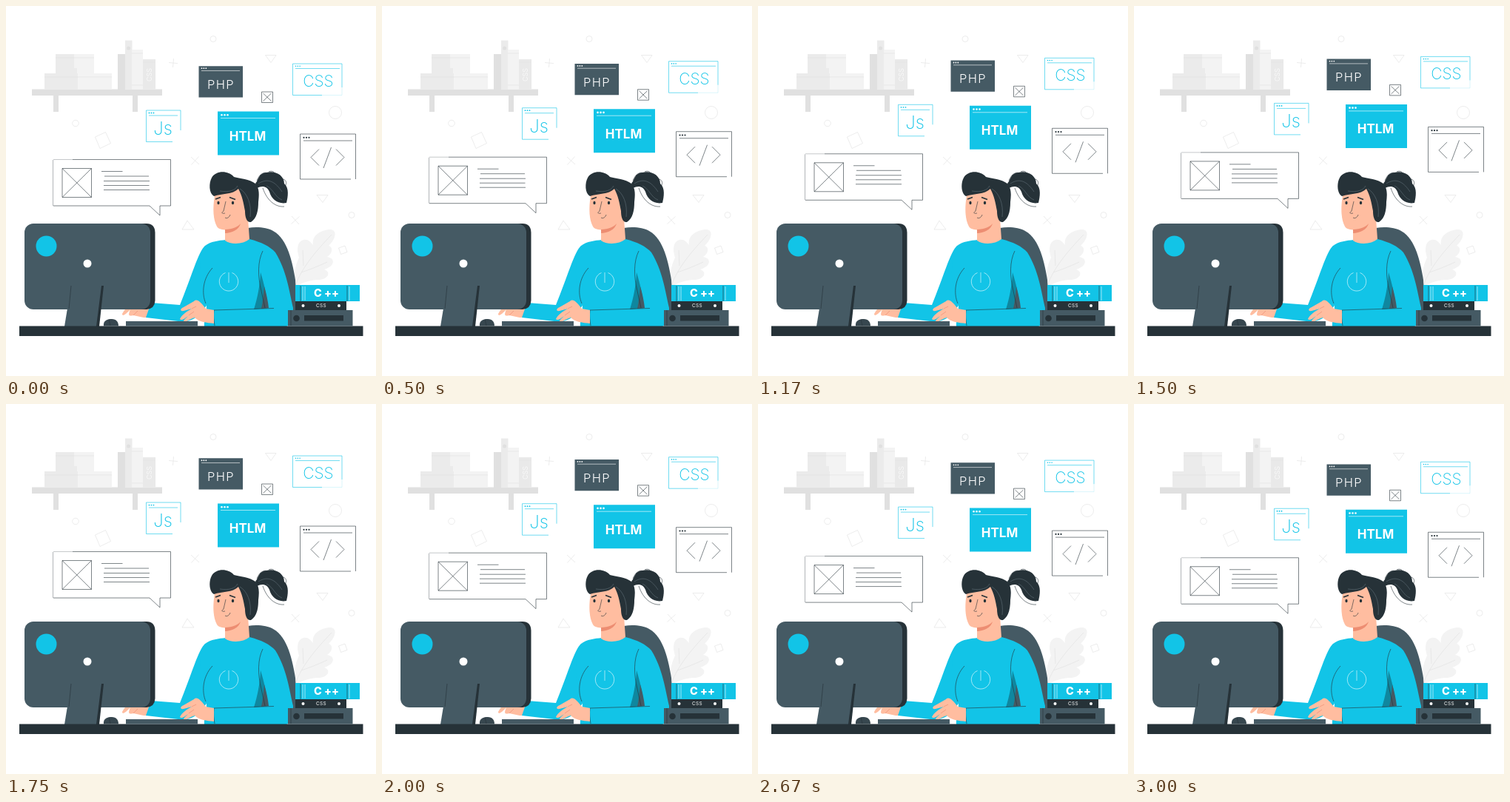
Animation, 500 px wide and 500 px high, one loop 3.04 s. Source, as an HTML page:

```html
<!DOCTYPE html>
<html lang="en">
<head>
<meta charset="utf-8">
<title>Coding at a desk</title>
<style>
html, body { margin: 0; width: 100%; height: 100%; overflow: hidden; background: #fff; }
svg { display: block; width: 100vw; height: 100vh; }
text { font-family: Inter, "Open Sans", sans-serif; text-anchor: middle; }
.line { fill: none; stroke: #263238; stroke-width: .6; }
.faint { fill: none; stroke: #e0e0e0; stroke-width: .6; }
.cyan { fill: #12c4e7; }
.dark { fill: #263238; }
.slate { fill: #455a64; }
.skin { fill: #ffbda0; }
.white { fill: #fff; }
.blue { stroke: #12c4e7; }
.pale { stroke: #fff; }
.blush { stroke: #e98970; }
.strand { stroke: #607078; }
</style>
</head>
<body>
<svg viewBox="0 0 500 500">
  <!-- shelf -->
  <g fill="#e0e0e0">
    <path d="M35 112.500h176v8.500H35zM64 121h7v22h-7zM171 121h7v22h-7zM151 65h10v47.500h-10z"/>
    <path fill="#ebebeb" d="M52 91h45v21.500H52zM67 65h29v26H67zM161 46.500h9.500v66H161z"/>
    <path fill="#f3f3f3" d="M97 91h46v21.500H97zM92 65h27v19H92zM96 84h23v7H96zM170 59h15v53.500h-15z"/>
    <path fill="#e9e9e9" d="M185 72h17v40.500h-17z"/>
    <path class="faint" d="M52 96h91M67 70h52M170 64h15M170 107h15M185 76h17M164 56h4"/>
    <circle cx="165.500" cy="57" r="2.500"/>
    <text transform="translate(197 93) rotate(-90)" font-size="9" fill="#f8f8f8">CSS</text>
  </g>

  <!-- scattered shapes -->
  <g class="faint">
    <circle cx="280" cy="44.500" r="4"/><circle cx="445" cy="144" r="8.500"/>
    <circle cx="94" cy="158.500" r="4.300"/><circle cx="467" cy="282.500" r="4"/>
    <path d="M220 76.500l12 1M226.500 71l-1 12M350.500 66.500h14.500l-7 10zM250 204l11 10M260.500 203.500l-10 11M386 284l10 11M396.500 284.500l-11 10M420 255.500h15l-7 10zM238 302l7-12 9 12z"/>
    <path d="M120.500 177l14-6.500 7 15-14.500 7zM449.500 327l8.500-3 3 8.500-8.500 3z"/>
  </g>

  <!-- leaf -->
  <path fill="#f3f3f3" d="M391 378C388 367 390 352 396 340C392 328 394 318 402 316C409 315 411 319 415 323C413 310 424 304 436 302C449 301 446 315 436 324C441 325 443 333 434 339C446 341 444 352 430 356C441 360 434 371 420 370C408 371 398 375 394 378z"/>
  <path class="faint" d="M391 378C399 355 417 333 440 309M402 351L401 330M399 360C411 356 421 352 434 346"/>

  <!-- chair -->
  <path class="slate" d="M298 318C312 296 346 296 361 304C381 315 387 347 391 370L393 412H350z"/>

  <!-- far hand and arm -->
  <path class="skin" d="M196 402C183 398 178 391 174 396C168 402 160 410 157 416C157 420 162 417 168 410C165 417 165 420 172 418L186 421H194z"/>
  <path class="line blush" d="M168 410L173 406M172 418L178 412"/>
  <path class="cyan" d="M269 324C260 331 250 368 235 404L196 401L189 421L237 426.500C260 428 272 405 284 380z"/>

  <!-- torso -->
  <path class="cyan" d="M269 324C277 318 287 317 297 316C305 321 319 321 329 315C345 319 357 325 364 333C379 357 383 386 388 408C388 422 385 430 379 433H268C267 420 277 405 265 385C260 365 261 340 269 324z"/>
  <path fill="#0f879f" d="M344 360C349 376 352 390 354 408L335 410C340 393 343 379 344 360z"/>
  <path class="slate" d="M349 379C352 389 354 399 355 408L345 409C347 400 348 390 349 379z"/>
  <path class="line" d="M347 331C340 345 340 365 345 385L350 408M281 411L362 408.500M279 354C266 368 264 388 270 402M281 411C280 419 281 425 282 432"/>
  <path class="line pale" d="M296.500 360.500A12.700 12.700 0 1 0 305.500 360.500M301 360V374"/>

  <!-- near hand -->
  <path class="skin" d="M281 411L270 409C263 400 258 395 254 399L240 407C235 409 235 413 240 412L251 409C244 413 238 417 235 423C237 426 242 422 247 418C242 423 238 426 241 427C246 426 250 422 255 421C261 427 271 428 281 429z"/>
  <path class="line blush" d="M251 409L257 406M247 418L254 413"/>

  <!-- ponytail, head and hair -->
  <path class="dark" d="M337 240C342 234 341 226 352 225C364 222 376 229 376 240C383 246 381 258 379 266C368 268 359 262 356 251C353 244 347 242 339 246z"/>
  <path class="line" d="M339 236C343 226 349 224 354 226M355 224C361 221 366 227 363 231M347 246C353 264 365 272 376 271M374 234C380 235 379 241 377 244"/>
  <path class="line strand" d="M341 240C355 231 365 239 373 251M352 243C361 247 364 259 373 262"/>
  <path class="skin" d="M296 297V317C304 323 321 322 329 315L327 287C332 275 328 251 317 246C300 243 284 247 282 256C279 274 280 289 285 298C288 303 298 303 305 302z"/>
  <path fill="#ed8d72" d="M296 302C306 302 314 298 317 294C315 302 305 307 296 307z"/>
  <path class="dark" d="M281 257C274 253 274 239 278 232C284 222 300 222 308 231C316 233 329 234 337 240C343 247 342 256 341 265C341 276 339 287 331 292C325 293 323 285 323 277C321 266 319 256 314 247C306 255 292 253 281 257z"/>
  <path class="line" d="M297 264L294 277C291 279 291 281 296 280M296 286C299 288 302 285 303 282"/>
  <path class="line" style="stroke-width:1.600" d="M283 261L290 258.500M302 258.500L310 261.500"/>
  <path class="line strand" d="M289 250C302 252 310 249 313 243M316 247C326 253 332 267 330 285"/>
  <ellipse class="dark" cx="287" cy="266" rx="1.600" ry="2.200"/>
  <ellipse class="dark" cx="306.500" cy="266" rx="1.700" ry="2.300"/>

  <!-- monitor -->
  <path class="dark" d="M40 294H190Q201 294 201.500 306V398Q201 409 190 410H40z"/>
  <rect class="slate" x="25" y="294" width="170" height="116" rx="12"/>
  <path class="dark" d="M124 378H132L126 433H118z"/>
  <path class="slate" d="M88 378H129L122 433H79z"/>
  <path class="line" d="M88 378L85 409"/>
  <circle class="white" cx="110" cy="348" r="5.500"/>
  <circle class="cyan" cx="54.500" cy="324.500" r="14"/>

  <!-- desk -->
  <rect class="dark" x="18" y="432.500" width="464.500" height="13.500"/>
  <path fill="#37474f" d="M132 432.500C131 425 137 423 143 423C149 423 152 427 152 432.500z"/>
  <path class="line" d="M139 423L141 432"/>
  <path class="slate" d="M162 426H259V432.500H162z"/>

  <!-- books -->
  <path class="slate" d="M381 411H468.500V432.500H381z"/>
  <path class="dark" d="M403 418H456V425.500H403zM391 399H460V411H391z"/>
  <path class="line" d="M385 411V432"/>
  <circle class="dark" cx="392.500" cy="422" r="4.300"/>
  <circle class="white" cx="401.500" cy="405" r="2"/><circle class="white" cx="450" cy="405" r="2"/>
  <text class="white" x="426" y="407.300" font-size="6.500" letter-spacing=".3">CSS</text>
  <path class="cyan" d="M391 377H478V399H391z"/>
  <path class="line" d="M398 378V399M461 378V399"/>
  <path class="line pale" d="M401 379V398M404 379V398M464 379V398"/>
  <text class="white" x="433" y="392.500" font-size="14.500" font-weight="800">C ++</text>

  <!-- floating panels -->
  <g id="float">
    <path class="line" stroke-opacity=".6" d="M63.500 208V270"/>
    <path class="line" d="M90 207.500H222.500V270H208V283L194 270H64"/>
    <path class="line" stroke-opacity=".45" d="M64 207.500H90"/>
    <path class="line" d="M76 219.500H115.500V258.500H76zL115.500 258.500M115.500 219.500L76 258.500M129 223.500H157.500M133 230H193M132 236.500H194M132 242.500H193.500M132 248.500H194"/>

    <path class="slate" d="M260.500 81.200H320V123.500H260.500z"/>
    <path class="line pale" d="M264 87.500H316"/>
    <text class="white" x="290.500" y="112" font-size="16.500" font-weight="300" letter-spacing="1.300">PHP</text>

    <path class="line blue" d="M427 120.500H387.500V78H454V110M391 84.500H451"/>
    <path class="line blue" stroke-opacity=".25" d="M427 120.500H454V110"/>
    <text class="cyan" x="422" y="109" font-size="21" font-weight="200">CSS</text>

    <path class="line blue" d="M225 183.500H189.500V141H236V168M193 148H232"/>
    <text class="cyan" x="212" y="174" font-size="24" font-weight="200">Js</text>

    <path class="cyan" d="M286 142.500H369V201.500H286z"/>
    <path class="line pale" d="M290 151.500H364"/>
    <text class="white" x="326.500" y="182" font-size="17" font-weight="700">HTLM</text>

    <path class="line" d="M466 234H397.500V173H472.500V234M402 182H468M423 193.500L412 204.500L423 215.500M439.500 191L429 219M446 193.500L457 204.500L446 215.500"/>
    <path class="line" d="M345.500 116H360.500V130.500H345.500zM347.500 118L358.500 128.500M358.500 118L347.500 128.500"/>
  </g>
</svg>
<script>
const LOOP = 3040, RISE = 10, LEAD = 40;
const float = document.getElementById("float");

// window buttons: x, y, spacing, radius, colour
[
  [264.5, 84.2, 2.9, .9, "#fff"],
  [391.5, 81.2, 2.8, .8, "#12c4e7"],
  [193.5, 144.5, 3, .9, "#12c4e7"],
  [291.5, 147.2, 4, 1.3, "#fff"],
  [402.5, 177.8, 3.5, 1.1, "#263238"]
].forEach(([x, y, gap, r, fill]) => {
  for (let i = 0; i < 3; i++) {
    const dot = document.createElementNS("http://www.w3.org/2000/svg", "circle");
    const attrs = { cx: x + i * gap, cy: y, r, fill };
    for (const key in attrs) dot.setAttribute(key, attrs[key]);
    float.append(dot);
  }
});

// steady rise and fall, already slightly under way when the loop starts
function draw() {
  const phase = (performance.now() + LEAD) % LOOP / LOOP;
  const lift = RISE * (1 - Math.abs(1 - 2 * phase) - 2 * LEAD / LOOP);
  float.setAttribute("transform", `translate(0 ${-lift})`);
  requestAnimationFrame(draw);
}
draw();
</script>
</body>
</html>
```
